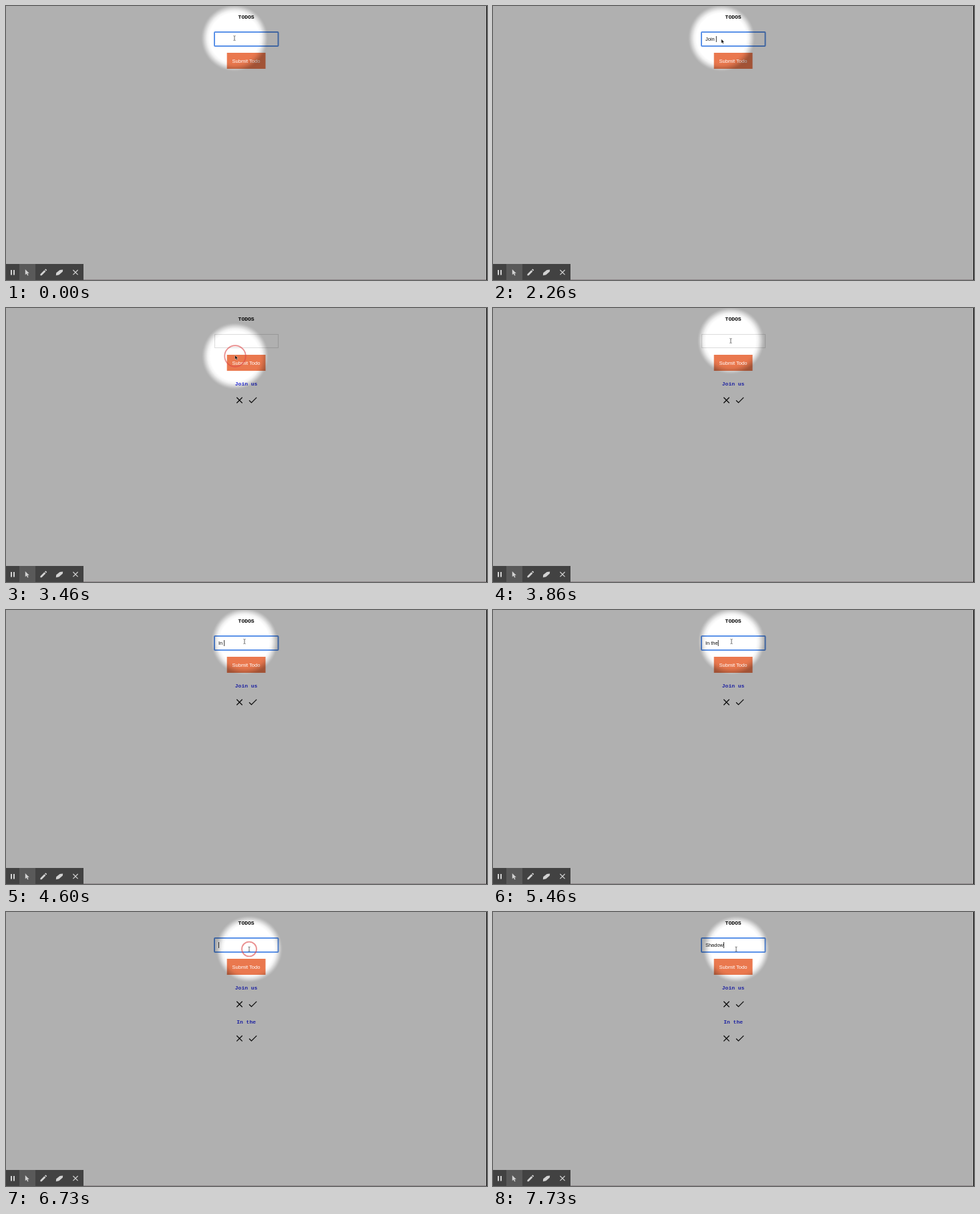
Recreate the animation shown at these times as an HTML page. Size 720 by 410 pixels, loop 8000 ms.

```html
<!DOCTYPE html>
<html lang="en">
<head>
<meta charset="utf-8">
<title>Todos</title>
<style>
  html, body { margin: 0; width: 100%; height: 100%; overflow: hidden; background: #fff; }
  svg { display: block; width: 720px; height: 410px; }
  text { white-space: pre; }
  .mono { font: bold 8px "Courier New", "Liberation Mono", monospace; text-anchor: middle; }
  .sans { font: 7.5px "Liberation Sans", Arial, sans-serif; }
  .todo { fill: #2930e8; }
  .line { fill: none; stroke: #111; stroke-width: 1.3; }
  .icons { fill: #d2d2d2; }
</style>
</head>
<body>
<svg viewBox="0 0 720 410">
  <defs>
    <radialGradient id="spot" gradientUnits="userSpaceOnUse" cx="0" cy="0" r="50">
      <stop offset=".74" stop-opacity="0"/>
      <stop offset=".82" stop-opacity=".05"/>
      <stop offset=".9" stop-opacity=".17"/>
      <stop offset=".96" stop-opacity=".27"/>
      <stop offset="1" stop-opacity=".31"/>
    </radialGradient>
    <g id="actions" class="line">
      <path d="M345.3 133.8l8.4 8.4m0-8.4l-8.4 8.4M364 138.3l3.4 3.4 7.8-7.8"/>
    </g>
  </defs>

  <rect width="720" height="410" fill="#fff"/>
  <text class="mono" x="359.6" y="18.8">TODOS</text>

  <rect id="plain" x="312.5" y="39.5" width="95" height="20" fill="none" stroke="#dcdcdc"/>
  <rect id="focus" x="312" y="39" width="95.5" height="21" rx="1" fill="none" stroke="#5c92e8" stroke-width="2"/>
  <text id="entry" class="sans" x="317.9" y="52.3" fill="#111"></text>
  <rect id="caret" y="45" width=".8" height="9" fill="#000"/>

  <rect id="pressed" x="329.8" y="68.8" width="59.6" height="26.4" rx="1.5" fill="none" stroke="#76a5f2" stroke-width="2"/>
  <rect x="330.7" y="70" width="57.8" height="24" fill="#ea784e"/>
  <text class="sans" x="359.5" y="85" fill="#fff" text-anchor="middle" style="font-size:7.6px">Submit Todo</text>

  <g id="first">
    <text class="mono todo" x="359.6" y="115.5">Join us</text>
    <use href="#actions"/>
  </g>
  <g id="second">
    <text class="mono todo" x="359.6" y="166.9">In the</text>
    <use href="#actions" y="51.2"/>
  </g>

  <rect id="shade" x="-720" y="-410" width="1440" height="820" fill="url(#spot)"/>

  <g id="mouse">
    <circle id="ring" fill="none" stroke="#dc4646" stroke-opacity=".6" stroke-width="1.8"/>
    <path id="beam" d="M-1.5-3.4q1.2 0 1.5.8q.3-.8 1.5-.8M0-2.6V2.8M-1.5 3.6q1.2 0 1.5-.8q.3.8 1.5.8" fill="none" stroke="#444" stroke-width=".8"/>
    <path id="arrow" d="M-.2-.4V5.6L1.2 4.4 2.2 6.6 3.3 6.1 2.3 4H4.2Z" fill="#000" stroke="#fff" stroke-width=".4"/>
  </g>

  <rect y="409" width="720" height="1" fill="#4d353c" opacity=".3"/>
  <rect x="719" width="1" height="410" fill="#000"/>
  <rect y="386" width="116" height="24" fill="#424242"/>
  <rect x="20" y="386" width="24" height="24" fill="#595959"/>
  <g class="icons">
    <path d="M7 395h2v7.5H7zM11 395h2v7.5h-2z"/>
    <path d="M28.8 394v8.2l2-1.7 1.4 3 1.4-.7-1.4-2.8h2.6z"/>
    <path d="M51.4 403.2v-2l6-6 2 2-6 6zM58 394.6l.9-.9q.5-.4 1 0l1 1q.4.5 0 1l-.9.9z"/>
    <path d="M75.2 399.2l5.4-4.2 4.6-.6-.4 3.2-5.4 4.6-4.6 1z"/>
    <path d="M100.4 395l7.2 7.2m0-7.2l-7.2 7.2" stroke="#d2d2d2" stroke-width="1.2"/>
  </g>
</svg>
<script>
const LOOP = 8000;
const el = {};
for (const node of document.querySelectorAll('svg [id]')) el[node.id] = node;

// time, text, caret visible
const typing = [
  [0, '', 0], [330, 'J', 1], [530, 'Jo', 1], [1060, 'Jo', 0], [1530, 'Jo', 1],
  [1730, 'Joi', 1], [1860, 'Join', 1], [2260, 'Join ', 1], [2400, 'Join u', 1],
  [2460, 'Join us', 1], [2730, 'Join us', 0], [3400, '', 0], [4000, '', 1],
  [4260, 'I', 1], [4400, 'In', 1], [4600, 'In ', 1], [4800, 'In t', 1],
  [4860, 'In th', 1], [5130, 'In the', 1], [5730, 'In the', 0], [6060, '', 0],
  [6660, '', 1], [7130, 'S', 1], [7260, 'Sh', 1], [7460, 'Sha', 1],
  [7530, 'Shad', 1], [7730, 'Shadow', 1]
];
// time, x, y
const path = [
  [0, 342, 48], [3130, 342, 48], [3330, 343, 72], [3530, 343, 72],
  [3930, 357, 47], [5460, 357, 47], [5730, 362.5, 77.5], [6200, 362.5, 77.5],
  [6560, 364, 55.5], [LOOP, 364, 55.5]
];
// press time, ring end
const clicks = [[3260, 3530], [4000, 4230], [5730, 6060], [6630, 6880]];

const within = (t, a, b) => t >= a && t < b;
const show = (node, on) => node.setAttribute('visibility', on ? 'visible' : 'hidden');

function mouseAt(t) {
  const i = path.findIndex(p => p[0] > t);
  const [t0, x0, y0] = path[i - 1], [t1, x1, y1] = path[i];
  const u = (t - t0) / (t1 - t0), k = u * u * (3 - 2 * u);
  return [x0 + (x1 - x0) * k, y0 + (y1 - y0) * k];
}

function draw(t) {
  const [, text, caret] = typing.findLast(s => s[0] <= t);
  if (el.entry.textContent !== text) el.entry.textContent = text;
  show(el.caret, caret);
  el.caret.setAttribute('x', 318 + (text ? el.entry.getComputedTextLength() : 0));

  const focused = !within(t, 3260, 4000) && !within(t, 5730, 6660);
  show(el.focus, focused);
  show(el.plain, !focused);
  show(el.pressed, within(t, 3260, 3400) || within(t, 5730, 6060));
  show(el.first, t >= 3400);
  show(el.second, t >= 6060);

  const [x, y] = mouseAt(t);
  const move = `translate(${x} ${y})`;
  el.shade.setAttribute('transform', move);
  el.mouse.setAttribute('transform', move);

  const arrow = within(t, 800, 3800) || within(t, 5560, 6440);
  show(el.arrow, arrow);
  show(el.beam, !arrow);
  // the tip rests slightly lower while the pointer is over the field
  el.arrow.setAttribute('transform', `translate(0 ${t < 3130 ? 2 : -.8})`);

  const click = clicks.find(c => within(t, c[0], c[1]));
  show(el.ring, click);
  if (click) {
    const u = Math.min(1, (t - click[0]) / 230);
    el.ring.setAttribute('r', 16 * (1 - (1 - u) ** 2));
  }
}

const start = performance.now();
function tick() {
  draw((performance.now() - start) % LOOP);
  requestAnimationFrame(tick);
}
tick();
</script>
</body>
</html>
```
